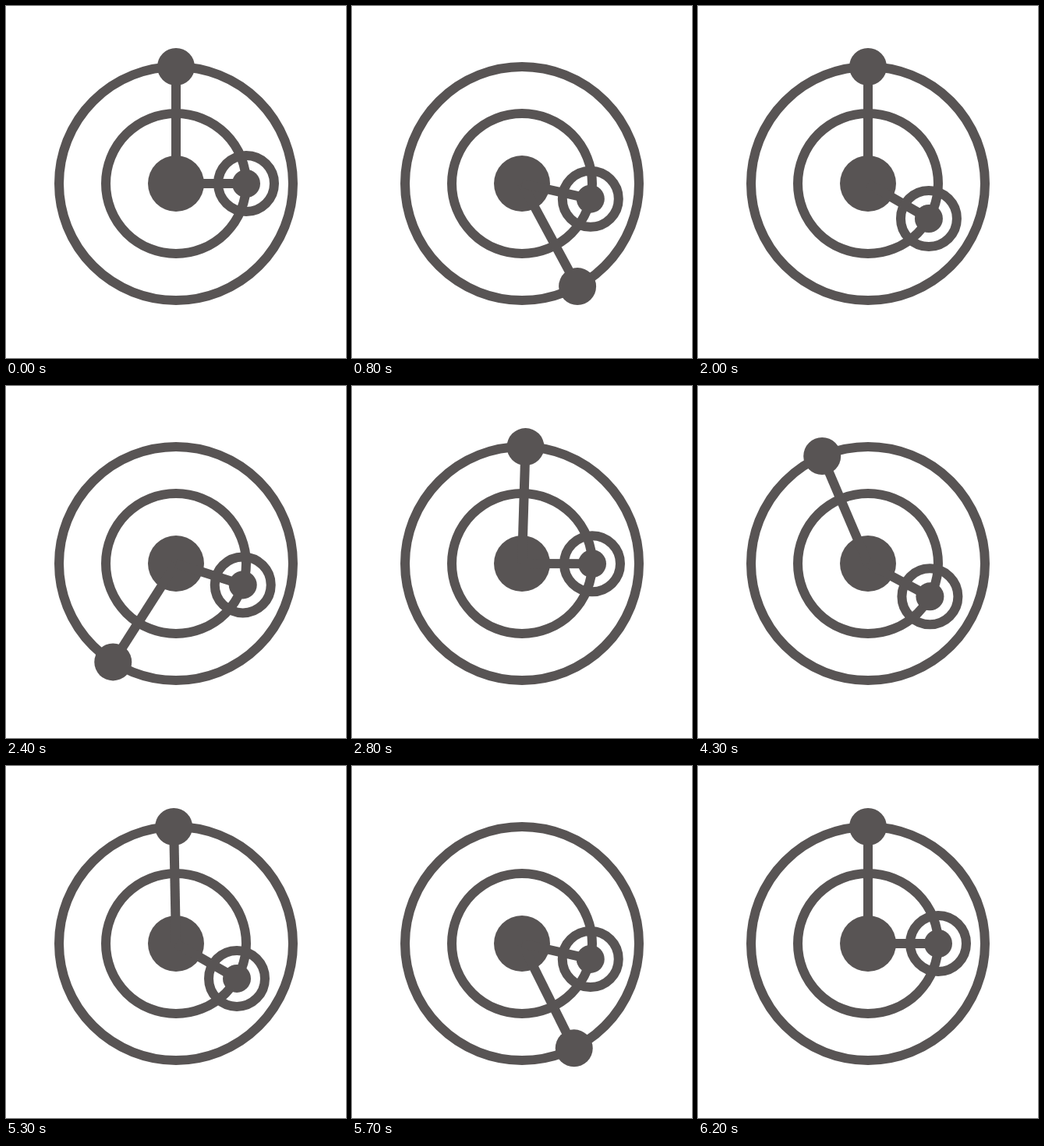
Write an HTML page with a canvas that moves like this. It is 436 px wide and 452 px high and loops after 6.5 s.

```html
<!DOCTYPE html>
<html lang="en">
<head>
<meta charset="utf-8">
<title>Orbits</title>
<style>
  html, body { margin: 0; width: 100%; height: 100%; overflow: hidden; background: #fff; }
  canvas { display: block; width: 436px; height: 452px; }
</style>
</head>
<body>
<canvas id="stage" width="436" height="452"></canvas>
<script>
const ctx = document.getElementById('stage').getContext('2d');
const LOOP = 6500, STEP = 100;
const CX = 218, CY = 228, COLOR = '#585454';

// Swings between rest (0) and turned (1): midpoint and duration in ms.
const SWINGS = [
  { mid: 833, dur: 720, from: 0, to: 1 },
  { mid: 2442, dur: 795, from: 1, to: 0 },
  { mid: 4068, dur: 720, from: 0, to: 1 },
  { mid: 5666, dur: 795, from: 1, to: 0 }
];

// cubic-bezier(.42, 0, .58, 1), solved by bisection
function easeInOut(x) {
  if (x <= 0) return 0;
  if (x >= 1) return 1;
  let lo = 0, hi = 1;
  for (let i = 0; i < 24; i++) {
    const s = (lo + hi) / 2, r = 1 - s;
    if (3 * r * r * s * 0.42 + 3 * r * s * s * 0.58 + s * s * s < x) lo = s;
    else hi = s;
  }
  return lo * lo * (3 - 2 * lo);
}

function turnAt(t) {
  let turn = 0;
  for (const { mid, dur, from, to } of SWINGS) {
    const x = (t - mid) / dur + 0.5;
    if (x > 0) turn = from + (to - from) * easeInOut(x);
  }
  return turn;
}

function circle(x, y, r, filled) {
  ctx.beginPath();
  ctx.arc(x, y, r, 0, Math.PI * 2);
  if (filled) ctx.fill();
  else ctx.stroke();
}

// Arm from the centre with a ball at its end; returns the ball's place.
function arm(angle, length, ball) {
  const x = CX + length * Math.cos(angle);
  const y = CY + length * Math.sin(angle);
  ctx.beginPath();
  ctx.moveTo(CX, CY);
  ctx.lineTo(x, y);
  ctx.stroke();
  circle(x, y, ball, true);
  return [x, y];
}

function draw(t) {
  const turn = turnAt(t);
  ctx.fillStyle = '#fff';
  ctx.fillRect(0, 0, 436, 452);
  ctx.fillStyle = ctx.strokeStyle = COLOR;
  ctx.lineWidth = 12;
  circle(CX, CY, 150);
  circle(CX, CY, 90);
  circle(CX, CY, 36, true);
  arm(turn * Math.PI * 2 - Math.PI / 2, 150, 24);
  const [x, y] = arm(turn * Math.PI / 6, 90, 18);
  circle(x, y, 36);
}

const start = performance.now();
function tick() {
  const t = (performance.now() - start) % LOOP;
  draw(Math.floor(t / STEP) * STEP);
  requestAnimationFrame(tick);
}
tick();
</script>
</body>
</html>
```
